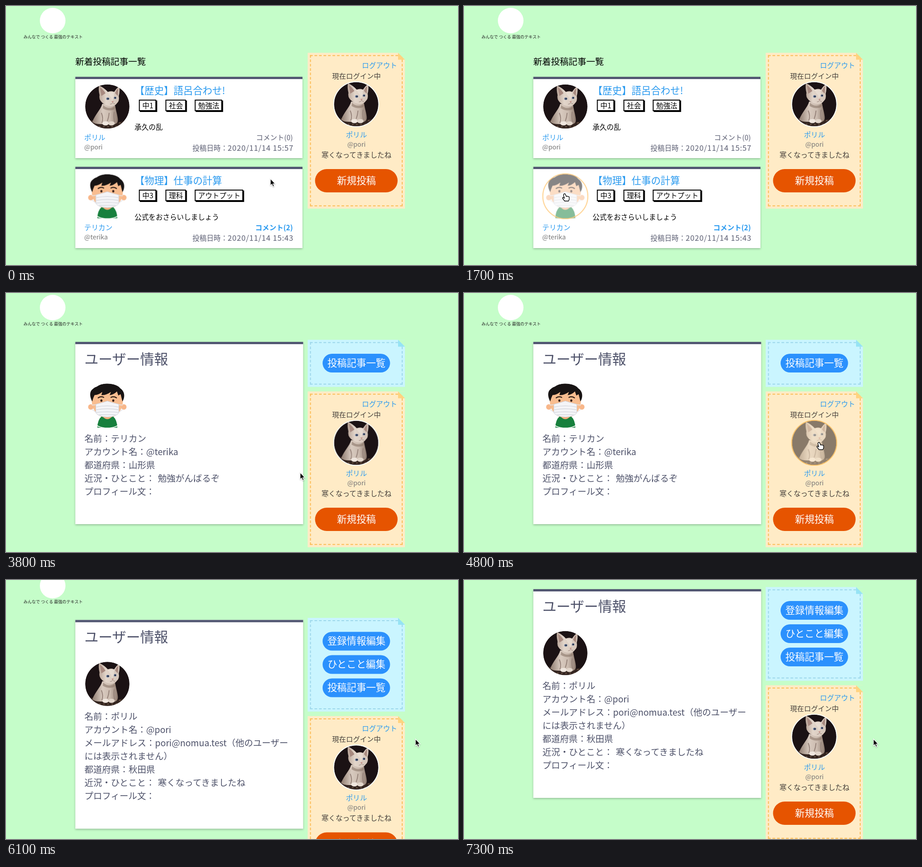
Recreate the animation shown at these times as an HTML page. Size 988 px wide and 567 px high, loop 7.4 s.

```html
<!DOCTYPE html>
<html lang="ja">
<head>
<meta charset="utf-8">
<title>新着投稿記事一覧</title>
<style>
html, body { margin: 0; width: 100%; height: 100%; overflow: hidden; background: #c5fdc9; }
svg { display: block; }
text { font: 15.4px "Noto Sans CJK JP", "Noto Sans CJK", sans-serif; fill: #000; }
.heading { font-size: 19.3px; }
.title { font-size: 21.2px; }
.link, .title { fill: #2a9aef; }
.muted { font-size: 14.2px; fill: #777; }
.meta { fill: #5c5f73; }
.date { font-size: 16.5px; letter-spacing: .8px; }
.dark { fill: #443f3a; }
.bold { font-weight: bold; }
.end { text-anchor: end; }
.mid, .button { text-anchor: middle; }
.button { font-size: 21.2px; font-weight: 500; fill: #fff; }
.info text { font-size: 19.3px; fill: #4d5169; word-spacing: 2.5px; }
.info .big { font-size: 30.6px; }
.tagline { font-size: 9px; fill: #222; }
.card { fill: #fff; filter: drop-shadow(0 2px 2px rgba(0,0,0,.25)); }
.bar { fill: #525772; }
.tags rect { fill: #fff; stroke: #000; stroke-width: 2; filter: drop-shadow(2px 2px 0 #000); }
.dash { fill: none; stroke-width: 2; stroke-dasharray: .6 .4; }
.avatar { color: #fff; }
.arrow { filter: drop-shadow(0 1px 1px rgba(0,0,0,.3)); }

.list, .user, .own, .arrow, .hand, .hover-boy, .hover-cat {
  animation: 7.4s step-end infinite;
}
.list { animation-name: list; }
.user { animation-name: user; }
.own { animation-name: own; }
.arrow { animation-name: arrow; }
.hand { animation-name: hand; }
.hover-boy { animation-name: hover-boy; }
.hover-cat { animation-name: hover-cat; }
.scroll { animation: scroll 7.4s infinite; }
.cursor { animation: move 7.4s ease-in-out infinite; }

@keyframes list { 0% { visibility: visible } 33.78%, 100% { visibility: hidden } }
@keyframes user { 0%, 67.57%, 100% { visibility: hidden } 33.78% { visibility: visible } }
@keyframes own { 0% { visibility: hidden } 67.57%, 100% { visibility: visible } }
@keyframes arrow {
  0%, 33.78%, 67.57%, 100% { visibility: visible }
  16.49%, 56.08% { visibility: hidden }
}
@keyframes hand {
  0%, 33.78%, 67.57%, 100% { visibility: hidden }
  16.49%, 56.08% { visibility: visible }
}
@keyframes hover-boy {
  0%, 33.78%, 100% { opacity: 1; color: #fff }
  16.49% { opacity: .52; color: #f90 }
}
@keyframes hover-cat {
  0%, 67.57%, 100% { opacity: 1; color: #fff }
  56.08% { opacity: .52; color: #f90 }
}
@keyframes move {
  0%, 6.76% { transform: translate(578px, 378px) }
  20.27%, 33.78% { transform: translate(220px, 411px) }
  38.5%, 51.35% { transform: translate(643px, 393px) }
  59.46%, 68.9% { transform: translate(776px, 327px) }
  74.3%, 100% { transform: translate(895px, 348px) }
}
@keyframes scroll {
  0%, 80.4% { transform: none; animation-timing-function: ease-in-out }
  86.49% { transform: translateY(-83px); animation-timing-function: ease-out }
  89.2%, 100% { transform: translateY(-87px) }
}
</style>
</head>
<body>
<svg width="988" height="567" viewBox="0 0 988 567">
<defs>
  <clipPath id="round"><circle r="48.5"/></clipPath>
  <linearGradient id="face">
    <stop stop-color="#b9a598"/><stop offset=".35" stop-color="#e2d5ca"/><stop offset="1" stop-color="#d3c3b7"/>
  </linearGradient>
  <linearGradient id="body">
    <stop stop-color="#8f7c70"/><stop offset=".4" stop-color="#d8cabf"/>
    <stop offset=".7" stop-color="#cbbbaf"/><stop offset="1" stop-color="#8d7a6f"/>
  </linearGradient>

  <g id="cat">
    <g clip-path="url(#round)">
      <rect x="-50" y="-50" width="100" height="100" fill="#1b1214"/>
      <path d="M-50 32Q-20 27 0 33T50 27V50H-50Z" fill="#33241f"/>
      <path d="M-46 36H44M-36 44H38" stroke="#6b5546" stroke-width="2.5" stroke-dasharray="3 6"/>
      <path d="M-11-6C-15 8-26 16-33 34Q-24 40-8 38L16 39Q24 36 23 28C22 18 19 10 17-2Z" fill="url(#body)"/>
      <path d="M-9-3Q2 8 17 0L16 6Q4 12-10 4Z" fill="#8d786c" opacity=".6"/>
      <path d="M-13 14Q-8 26-12 36M4 14Q3 24 0 32M15 12Q13 24 16 34" fill="none" stroke="#96837a" stroke-width="2"/>
      <ellipse cx="-4" cy="37" rx="7" ry="4.5" fill="#efe6de"/>
      <ellipse cx="9" cy="37" rx="7" ry="4.5" fill="#e2d6cb"/>
      <path d="M-18-46Q-7-41 1-32Q9-35 15-32Q20-40 26-44Q28-34 25-23Q27-12 21-7Q16 0 9 0Q-5-2-12-9Q-19-16-17-25Q-20-37-18-46Z" fill="url(#face)"/>
      <path d="M-16-42Q-8-36-4-29L-13-23ZM24-40Q19-36 17-29L23-23Z" fill="#a88a80"/>
      <path d="M1-31Q4-24 8-20L10-12L14-20L15-31Z" fill="#eee4da" opacity=".6"/>
      <ellipse cx="1" cy="-17" rx="3.4" ry="2.8" fill="#64779a"/>
      <ellipse cx="17" cy="-19" rx="2.8" ry="2.6" fill="#64779a"/>
      <circle cx="1.5" cy="-17" r="1.6" fill="#20222e"/><circle cx="17.3" cy="-19" r="1.5" fill="#20222e"/>
      <path d="M9-11L14-12L12-8.5Z" fill="#c08880"/>
      <path d="M12-8.5Q10-5 6-5M12-8.5Q14-5 17-6" fill="none" stroke="#96807a"/>
    </g>
    <circle r="49.2" fill="none" stroke="currentColor" stroke-width="1.8"/>
  </g>

  <g id="boy">
    <circle cx="-36" cy="3" r="6" fill="#f8b78a"/><circle cx="36" cy="3" r="6" fill="#f8b78a"/>
    <path d="M-34-14C-33-34-24-40 0-40S33-34 34-14C35 10 20 27 0 27S-35 10-34-14Z" fill="#f8bd90"/>
    <path d="M-22 48Q-21 31-13 24Q0 29 13 24Q21 31 22 48Q0 50-22 48Z" fill="#17803d"/>
    <path d="M-9 25.5Q0 34 9 25.5Z" fill="#f2ad7d"/>
    <path d="M-33-9C-43-28-34-39-24-41Q-12-50 4-48Q22-47 28-38C40-30 38-16 33-9Q31-17 29-25L24-22L21-31Q14-24 5-23L8-30Q-4-22-13-23L-11-30Q-20-23-28-23Q-31-17-33-9Z" fill="#181414"/>
    <path d="M-20-17Q-14-21-8-18M8-18Q14-21 20-17" fill="none" stroke="#2a1b14" stroke-width="2.2" stroke-linecap="round"/>
    <ellipse cx="-13" cy="-11" rx="2.3" ry="2.8" fill="#38211a"/>
    <ellipse cx="13" cy="-11" rx="2.3" ry="2.8" fill="#38211a"/>
    <path d="M-24-2L-34-1M24-2L34-1M-23 16L-34 8M23 16L34 8" stroke="#e6e6ea" stroke-width="1.6"/>
    <path d="M-25-3Q-12-6 0-10Q12-6 25-3V16Q20 24 0 25Q-20 24-25 16Z" fill="#f4f4f7" stroke="#cfd1d8"/>
    <path d="M-24 3Q0-2 24 3M-24 9Q0 5 24 9M-24 15Q0 12 24 15M-18 20H18" fill="none" stroke="#c8cbd3" stroke-width="1.2"/>
    <circle r="49.2" fill="none" stroke="currentColor" stroke-width="1.8"/>
  </g>

  <path id="dash-row" class="dash" d="M664.5 108.5H867" pathLength="20.6"/>

  <g id="profile">
    <rect x="659.5" y="102.5" width="212.5" height="341" fill="#ffebc6"/>
    <g stroke="#fbbc55">
      <use href="#dash-row"/><use href="#dash-row" y="329"/>
      <path class="dash" d="M665.5 107.5V438.5" pathLength="34.6"/>
      <path class="dash" d="M866 107.5V438.5" pathLength="34.6"/>
    </g>
    <path d="M857 102.5H872V117.5Z" fill="#c5fdc9"/>
    <path d="M857 102.5V117.5H872Z" fill="#ffd380"/>
    <text class="link end" x="855" y="136">ログアウト</text>
    <text class="dark mid" x="766" y="159" style="font-size:15.2px">現在ログイン中</text>
    <text class="link mid" x="766" y="288">ポリル</text>
    <text class="muted mid" x="766" y="308">@pori</text>
    <text class="dark mid" x="766" y="331.5">寒くなってきましたね</text>
    <rect x="675.5" y="357" width="180.5" height="51" rx="25.5" fill="#e65400"/>
    <text class="button" x="766" y="390">新規投稿</text>
  </g>

  <g id="fold">
    <path d="M857 102.5H872V117.5Z" fill="#c5fdc9"/>
    <path d="M857 102.5V117.5H872Z" fill="#96e3f4"/>
  </g>
  <rect id="pill" x="692" y="133" width="147.5" height="41" rx="20.5" fill="#2b91fd"/>
</defs>

<g class="scroll">
  <circle cx="102" cy="32" r="28" fill="#fff"/>
  <text class="tagline mid" x="103" y="71">みんなで つくる 最強のテキスト</text>

  <g class="list">
    <text class="heading" x="151.5" y="129">新着投稿記事一覧</text>
    <g>
      <rect class="card" x="151.5" y="155" width="496.5" height="178"/>
      <rect class="bar" x="151.5" y="155" width="496.5" height="5"/>
      <use class="avatar" href="#cat" x="221.5" y="220"/>
      <text class="title" x="281.5" y="193">【歴史】語呂合わせ!</text>
      <g class="tags">
        <rect x="291.5" y="206" width="36" height="23"/><text x="298" y="224">中1</text>
        <rect x="349.5" y="206" width="43" height="23"/><text x="356" y="224">社会</text>
        <rect x="413.5" y="206" width="58" height="23"/><text x="420" y="224">勉強法</text>
      </g>
      <text x="281" y="271">承久の乱</text>
      <text class="link" x="171" y="294">ポリル</text>
      <text class="muted" x="171" y="314">@pori</text>
      <text class="meta end" x="627" y="294">コメント(0)</text>
      <text class="meta end" x="628.5" y="317">投稿日時：<tspan class="date">2020/11/14 15:57</tspan></text>
    </g>
    <g transform="translate(0 197)">
      <rect class="card" x="151.5" y="155" width="496.5" height="178"/>
      <rect class="bar" x="151.5" y="155" width="496.5" height="5"/>
      <use class="avatar hover-boy" href="#boy" x="221.5" y="219.5"/>
      <text class="title" x="281.5" y="193">【物理】仕事の計算</text>
      <g class="tags">
        <rect x="291.5" y="206" width="36" height="23"/><text x="298" y="224">中3</text>
        <rect x="349.5" y="206" width="43" height="23"/><text x="356" y="224">理科</text>
        <rect x="413.5" y="206" width="104" height="23"/><text x="420" y="224">アウトプット</text>
      </g>
      <text x="281" y="271">公式をおさらいしましょう</text>
      <text class="link" x="171" y="294">テリカン</text>
      <text class="muted" x="171" y="314">@terika</text>
      <text class="link bold end" x="627" y="294">コメント(2)</text>
      <text class="meta end" x="628.5" y="317">投稿日時：<tspan class="date">2020/11/14 15:43</tspan></text>
    </g>
    <use href="#profile"/>
    <use class="avatar" href="#cat" x="765.5" y="215"/>
  </g>

  <g class="user info">
    <rect class="card" x="151.5" y="107" width="498" height="399"/>
    <rect class="bar" x="151.5" y="107" width="498" height="5"/>
    <text class="big" x="171.5" y="156">ユーザー情報</text>
    <use class="avatar" href="#boy" x="221.5" y="246.5"/>
    <text x="171.5" y="325.5">名前：テリカン</text>
    <text x="171.5" y="354.5">アカウント名：@terika</text>
    <text x="171.5" y="383.5">都道府県：山形県</text>
    <text x="171.5" y="412.5">近況・ひとこと： 勉強がんばるぞ</text>
    <text x="171.5" y="441.5">プロフィール文：</text>
  </g>
  <g class="user">
    <rect x="659.5" y="102.5" width="212.5" height="103" fill="#caf5ff"/>
    <g stroke="#9bd6ea">
      <use href="#dash-row"/><use href="#dash-row" y="91"/>
      <path class="dash" d="M665.5 107.5V200.5" pathLength="9.6"/>
      <path class="dash" d="M866 107.5V200.5" pathLength="9.6"/>
    </g>
    <use href="#fold"/>
    <use href="#pill"/><text class="button" x="766" y="161">投稿記事一覧</text>
    <use href="#profile" y="113"/>
    <use class="avatar hover-cat" href="#cat" x="765.5" y="328"/>
  </g>

  <g class="own info">
    <rect class="card" x="151.5" y="107" width="498" height="457"/>
    <rect class="bar" x="151.5" y="107" width="498" height="5"/>
    <text class="big" x="171.5" y="156">ユーザー情報</text>
    <use class="avatar" href="#cat" x="221.5" y="247"/>
    <text x="171.5" y="325.5">名前：ポリル</text>
    <text x="171.5" y="354.5">アカウント名：@pori</text>
    <text x="171.5" y="383.5">メールアドレス：pori@nomua.test（他のユーザー</text>
    <text x="171.5" y="412.5">には表示されません）</text>
    <text x="171.5" y="441.5">都道府県：秋田県</text>
    <text x="171.5" y="470.5">近況・ひとこと： 寒くなってきましたね</text>
    <text x="171.5" y="499.5">プロフィール文：</text>
  </g>
  <g class="own">
    <rect x="659.5" y="102.5" width="212.5" height="205" fill="#caf5ff"/>
    <g stroke="#9bd6ea">
      <use href="#dash-row"/><use href="#dash-row" y="193"/>
      <path class="dash" d="M665.5 107.5V302.5" pathLength="20.6"/>
      <path class="dash" d="M866 107.5V302.5" pathLength="20.6"/>
    </g>
    <use href="#fold"/>
    <use href="#pill"/><text class="button" x="766" y="161">登録情報編集</text>
    <use href="#pill" y="51"/><text class="button" x="766" y="212">ひとこと編集</text>
    <use href="#pill" y="102"/><text class="button" x="766" y="263">投稿記事一覧</text>
    <use href="#profile" y="215"/>
    <use class="avatar" href="#cat" x="765.5" y="430"/>
  </g>
</g>

<g class="cursor">
  <path class="arrow" d="M0 0V15L3.3 12L5.7 17.6L8.2 16.5L5.9 11H10.4Z" fill="#000" stroke="#fff" stroke-width="1.2"/>
  <path class="hand" d="M-2 1Q0-1 1.5 1L3.5 6Q5 4.5 6 6Q7.5 5 8.5 6.5Q10 6 10 8.5V12L8.5 16H0L-4.5 10Q-5 8-3 8L-.5 10L-2.5 3Z" fill="#fff" stroke="#000" stroke-width="1.3" stroke-linejoin="round"/>
</g>
</svg>
</body>
</html>
```
